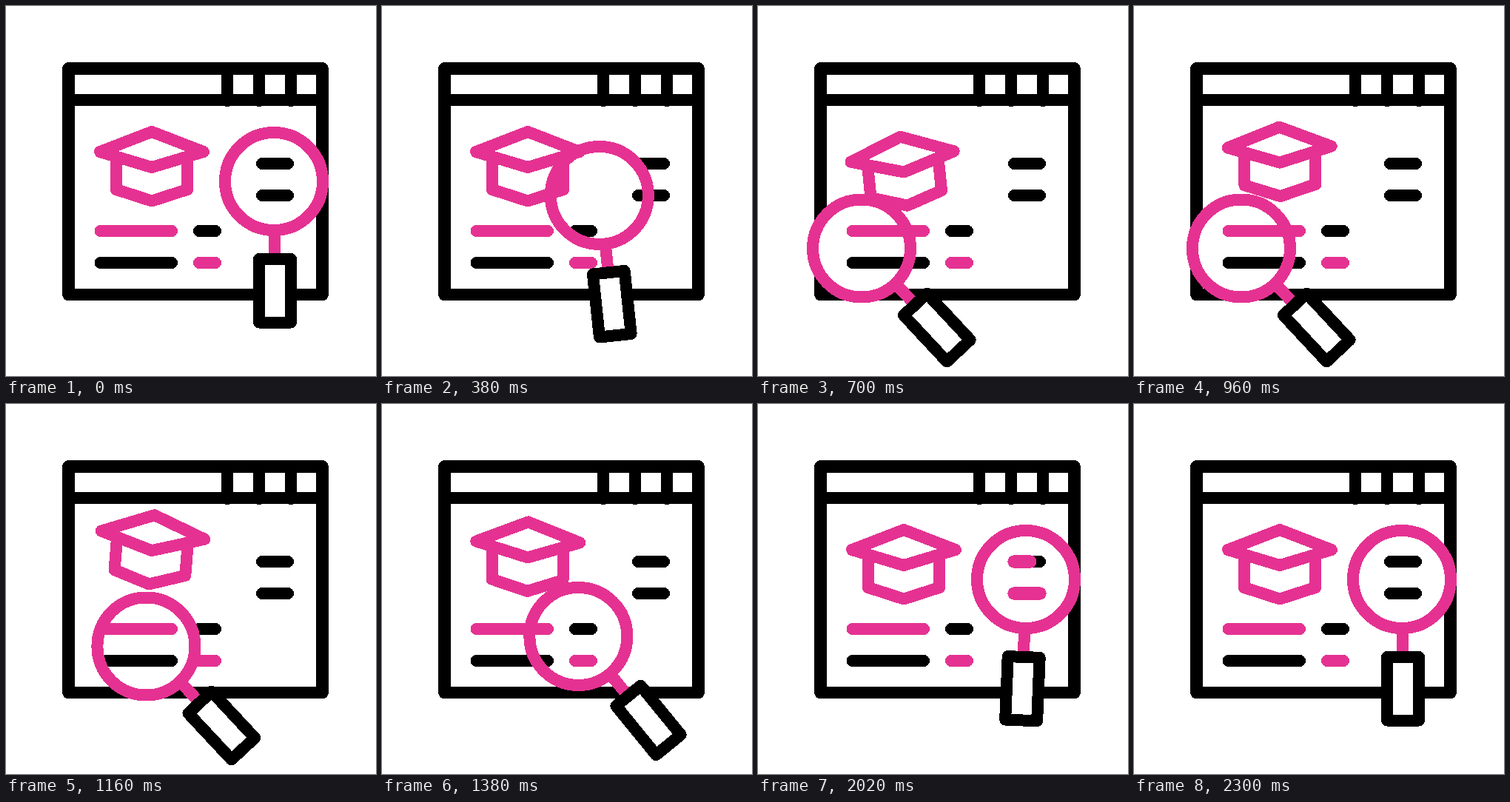
An HTML page for the animation above (2.4 s loop, 500 by 500 pixels).

```html
<!DOCTYPE html>
<html lang="en">
<head>
<meta charset="utf-8">
<title>Course search</title>
<style>
  html, body { margin: 0; width: 100%; height: 100%; overflow: hidden; background: #fff; }
  svg { display: block; width: 100vw; height: 100vh; fill: none; stroke: #000; stroke-width: 16; stroke-linecap: round; stroke-linejoin: round; shape-rendering: crispEdges; }
  .pink { stroke: #e53292; }
</style>
</head>
<body>
<svg viewBox="0 0 500 500">
  <path stroke-width="16.8" d="M84.5 84.5H427.5V390H84.5Z"/>
  <path d="M85 127H427M299 85V128M342 85V128M385 85V128"/>
  <circle id="glass" r="66" fill="#fff" stroke="none"/>
  <path d="M127.5 347H224M261 304H283M346 213H381M346 256H381"/>
  <path class="pink" d="M127.5 304H224M261 347H283"/>
  <path id="marks" class="pink" stroke-width="17.5"/>
  <path id="cap" class="pink" d="M127 197L197 170L267 197L197 218ZM149 205V248L197 263.5L245 248V205"/>
  <g id="lens">
    <g id="handle">
      <path class="pink" d="M1 66V104"/>
      <path fill="#fff" d="M-20 105H23V190.5H-20Z"/>
    </g>
    <circle class="pink" r="66"/>
  </g>
</svg>
<script>
  const LOOP = 2400, STEP = 20;

  const place = (id, transform) =>
    document.getElementById(id).setAttribute('transform', transform);

  function draw(t) {
    // Smooth rise from 0 to 1 between two times.
    const rise = (from, to) => {
      const p = Math.min(1, Math.max(0, (t - from) / (to - from)));
      return p * p * (3 - 2 * p);
    };
    // Rise, hold, then fall back to 0.
    const visit = (from, full, leave, gone) => rise(from, full) - rise(leave, gone);
    const swing = (from, peak, to) => visit(from, peak, peak, to);

    // The lens sweeps left, then down; the handle turns late and overshoots on return.
    const x = 362 - 222 * visit(205, 680, 878, 1802);
    const y = 237 + 90.5 * visit(268, 648, 1240, 1814);
    const turn = 2.7 * swing(1260, 1940, 2300) - 43 * visit(280, 705, 1260, 1940);
    place('glass', `translate(${x} ${y})`);
    place('lens', `translate(${x} ${y})`);
    place('handle', `rotate(${turn})`);

    // The cap dips, hops up and settles.
    const dip = swing(420, 720, 1220);
    const hop = swing(720, 1220, 1580);
    const settle = swing(1220, 1580, 1880);
    const lift = 6.5 * dip - 21 * hop + 4 * settle;
    const tilt = 5 * hop - 6 * dip - 5 * settle;
    place('cap', `translate(0 ${lift}) rotate(${tilt} 197 216)`);

    // The lower dash is coloured first, then the upper one.
    const marks = [256, 213].map((lineY, i) => {
      const start = 1830 + 120 * i;
      const length = 35 * visit(start, start + 120, 2120, 2290);
      return length > 0 ? `M346 ${lineY}h${length}` : '';
    });
    document.getElementById('marks').setAttribute('d', marks.join(''));
  }

  const begin = performance.now();
  function tick() {
    const t = (performance.now() - begin) % LOOP;
    draw(Math.floor(t / STEP) * STEP);
    requestAnimationFrame(tick);
  }
  tick();
</script>
</body>
</html>
```
